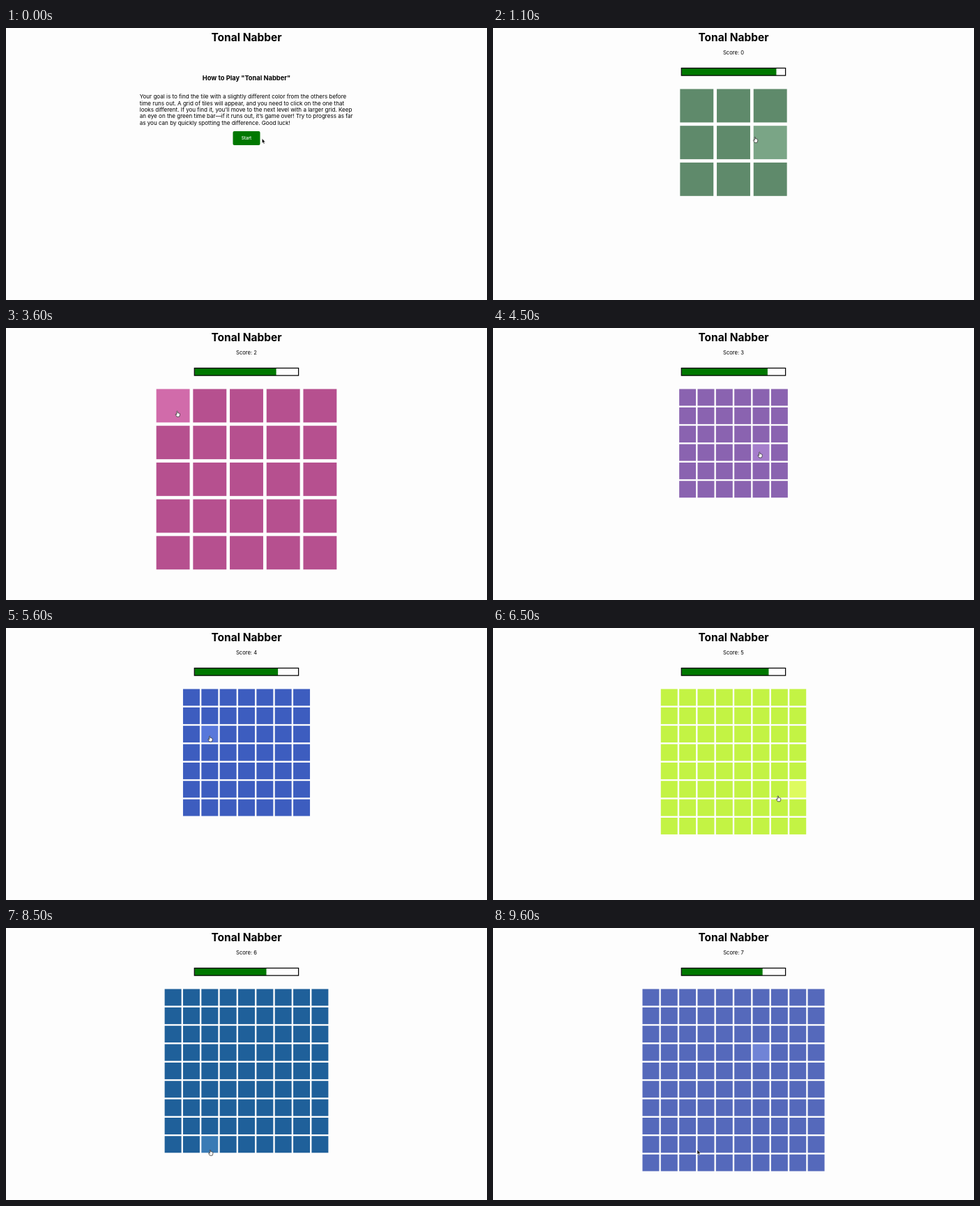
An HTML page that plays this animation: 690 px wide and 390 px high, repeating every 9700 ms.

```html
<!DOCTYPE html>
<html lang="en">
<head>
<meta charset="utf-8">
<title>Tonal Nabber</title>
<style>
  html, body { margin: 0; width: 100%; height: 100%; overflow: hidden; background: #fdfdfd; }
  svg { display: block; width: 690px; height: 390px; }
  text { font-family: Inter, sans-serif; fill: #000; }
  .mid { text-anchor: middle; }
  .bold { font-weight: 700; }
  .button { font-weight: 500; fill: #fff; }
  .green { fill: #007800; }
</style>
</head>
<body>
<svg viewBox="0 0 690 390">
  <text class="mid bold" x="345" y="18.9" font-size="15.5">Tonal Nabber</text>
  <g id="intro">
    <text class="mid bold" x="345" y="74.6" font-size="9.3">How to Play "Tonal Nabber"</text>
    <g id="rules" font-size="8.05"></g>
    <rect class="green" x="325.5" y="148" width="39" height="20" rx="2"/>
    <text class="mid button" x="345" y="160.3" font-size="6.3">Start</text>
  </g>
  <g id="game">
    <text id="score" class="mid" x="345" y="37.7" font-size="7.6"></text>
    <rect x="270.3" y="57.5" width="149.3" height="10.6" fill="#fff"/>
    <rect id="time" class="green" x="271" y="57.5" height="10.6"/>
    <rect x="270.3" y="57.5" width="149.3" height="10.6" fill="none" stroke="#000" stroke-width="1.25"/>
    <g id="grid"></g>
  </g>
  <g id="cursor">
    <path id="arrow" d="M0 0V6.6L1.5 5.3 2.5 7.8 3.7 7.3 2.7 4.9H4.7Z" fill="#000" stroke="#fff" stroke-width=".5"/>
    <path id="hand" d="M-.7.6Q0-.2.6.6V2.8Q1.4 2.3 1.8 3 2.5 2.6 2.9 3.3 3.7 3.1 3.8 3.9V5.8L3 8.2H-.6L-2.4 5.2Q-2.5 4.2-1.6 4.5L-.7 5.3Z" fill="#fff" stroke="#222" stroke-width=".7"/>
  </g>
</svg>
<script>
const LOOP = 9700, STEP = 100;
const SCALE = 690 / 1440;
const DRAIN_PER_MS = 0.212 / 1000;
const TRAVEL = 0.85;
const TOP = 87.5, CENTER = 345;
const HOME = [367.3, 158.5], BUTTON = [354.5, 161.5];

const rules = [
  "Your goal is to find the tile with a slightly different color from the others before",
  "time runs out. A grid of tiles will appear, and you need to click on the one that",
  "looks different. If you find it, you’ll move to the next level with a larger grid. Keep",
  "an eye on the green time bar—if it runs out, it’s game over! Try to progress as far",
  "as you can by quickly spotting the difference. Good luck!"
];

// The cursor visits each route's points; the last one lies on the odd tile.
const stages = [
  { start: 0, route: [BUTTON, BUTTON] },
  { start: 700, color: "#5f8a6b", route: [[400, 150]] },
  { start: 1680, color: "#486983", route: [[482, 124], [450, 140], [425, 163]] },
  { start: 2600, color: "#b6508f", route: [[494, 198], [245.6, 119]] },
  { start: 3700, color: "#8a63b0", route: [[383, 178]] },
  { start: 4680, color: "#3d5dbf", route: [[458, 165], [292.3, 154.8]] },
  { start: 5750, color: "#c3f344", route: [[360, 215], [408.8, 240.6], [436, 233]] },
  { start: 7050, color: "#1f609a", route: [[395, 10], [322, 301], [293, 318]] },
  { start: 8570, color: "#5569bb", route: [[384, 179]] }
];

const $ = id => document.getElementById(id);
const make = (parent, name, attrs) => {
  const el = document.createElementNS("http://www.w3.org/2000/svg", name);
  for (const key in attrs) el.setAttribute(key, attrs[key]);
  return parent.appendChild(el);
};
const show = (el, on) => el.setAttribute("display", on ? "inline" : "none");
const mix = (a, b, k) => a + (b - a) * k;
const smooth = u => u * u * (3 - 2 * u);
const last = list => list[list.length - 1];
const lighten = hex => {
  const channels = hex.match(/\w\w/g).map(c => Math.min(251, parseInt(c, 16) + 27));
  return `rgb(${channels})`;
};

rules.forEach((line, i) => {
  make($("rules"), "text", { x: 191.7, y: 101.2 + i * 9.35 }).textContent = line;
});

function buildGrid(stage, count) {
  const size = (count < 6 ? 100 : 50) * SCALE, pitch = size * 1.1;
  const left = CENTER - (count * pitch - size * 0.1) / 2;
  const [oddX, oddY] = last(stage.route);
  const oddCol = Math.floor((oddX - left) / pitch);
  const oddRow = Math.floor((oddY - TOP) / pitch);
  const group = make($("grid"), "g", { fill: stage.color });
  for (let row = 0; row < count; row++) {
    for (let col = 0; col < count; col++) {
      const odd = col === oddCol && row === oddRow;
      make(group, "rect", {
        x: left + col * pitch, y: TOP + row * pitch, width: size, height: size,
        fill: odd ? lighten(stage.color) : stage.color
      });
    }
  }
  Object.assign(stage, { count, size, pitch, left, group });
}
stages.slice(1).forEach((stage, i) => buildGrid(stage, i + 3));

function cursorAt(t, index) {
  const { start, route } = stages[index], next = stages[index + 1];
  const from = index ? last(stages[index - 1].route) : HOME;
  if (!next) return from;
  const progress = Math.min(1, (t - start) / (next.start - start) / TRAVEL) * route.length;
  const leg = Math.min(route.length - 1, Math.floor(progress));
  const a = leg ? route[leg - 1] : from, b = route[leg];
  const k = smooth(progress - leg);
  return [mix(a[0], b[0], k), mix(a[1], b[1], k)];
}

function isClickable(x, y, { count, pitch, size, left }) {
  if (!count) return Math.abs(x - CENTER) < 19.5 && Math.abs(y - 158) < 10;
  const onTile = d => d >= 0 && d < count * pitch && d % pitch < size;
  return onTile(x - left) && onTile(y - TOP);
}

function render(ms) {
  const t = Math.floor((ms % LOOP) / STEP) * STEP;
  const index = stages.filter(s => s.start <= t).length - 1;
  const stage = stages[index];
  show($("intro"), index === 0);
  show($("game"), index > 0);
  stages.slice(1).forEach(s => show(s.group, s === stage));
  $("score").textContent = "Score: " + (index - 1);
  $("time").setAttribute("width", 148 * (1 - (t - stage.start) * DRAIN_PER_MS));

  const [x, y] = cursorAt(t, index);
  const hand = isClickable(x, y, stage);
  $("cursor").setAttribute("transform", `translate(${x} ${y})`);
  show($("hand"), hand);
  show($("arrow"), !hand);
}

const begin = performance.now();
function tick() {
  render(performance.now() - begin);
  requestAnimationFrame(tick);
}
tick();
</script>
</body>
</html>
```
